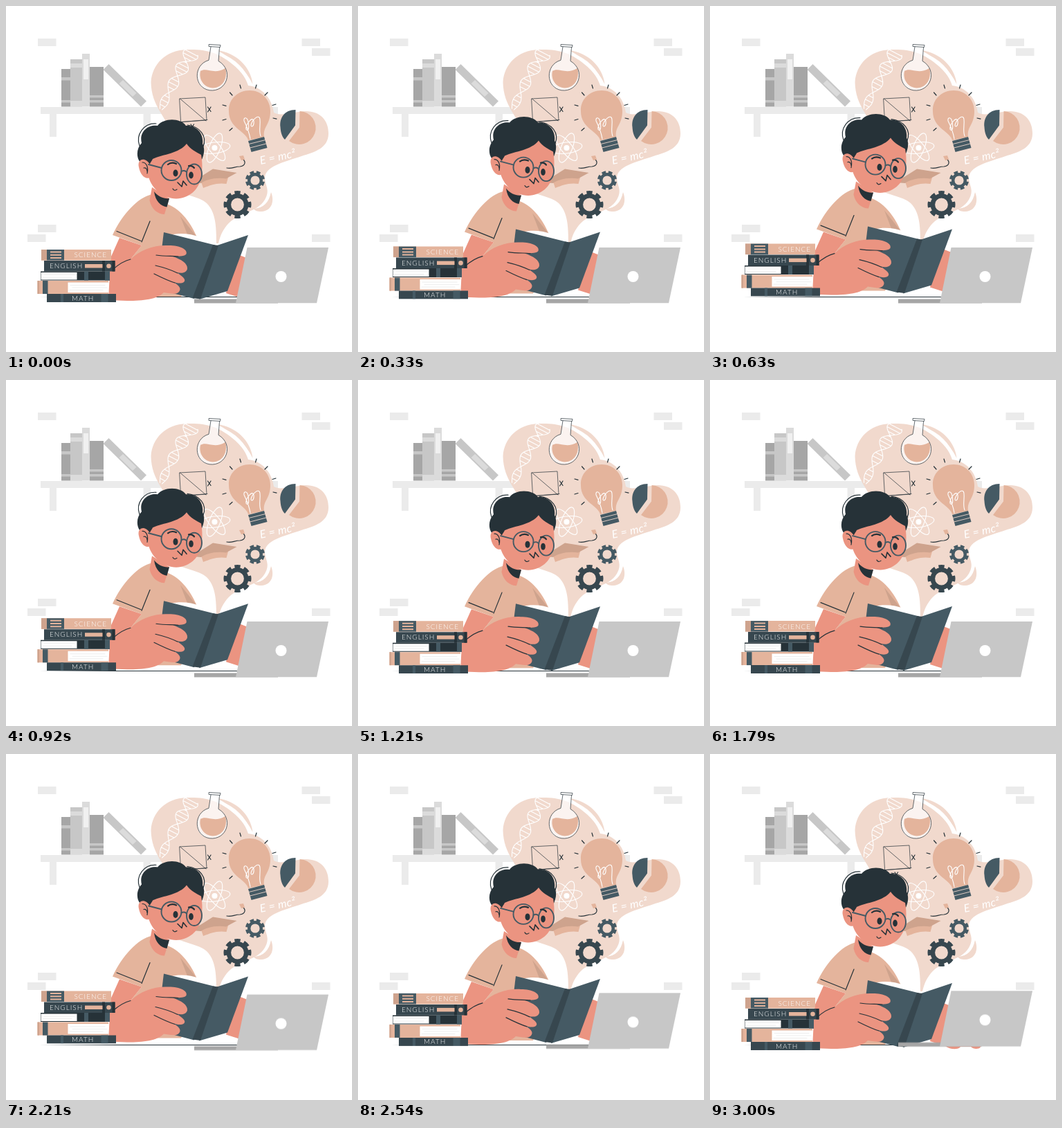
These frames come from a looping animation (500 px wide and 500 px high, 3.04 s). An HTML page:

```html
<!DOCTYPE html>
<html lang="en">
<head>
<meta charset="utf-8">
<title>Studying</title>
<style>
  html, body { margin: 0; width: 100%; height: 100%; overflow: hidden; background: #fff; }
  svg { display: block; width: 100vw; height: 100vh; }
  :root { --tan: #e4b49c; --pale: #f1d9cd; --shade: #cea38d; --skin: #eb9481; --ink: #263238; --slate: #455a64; --deep: #37474f; }
  .tan { fill: var(--tan); } .pale { fill: var(--pale); } .shade { fill: var(--shade); }
  .skin { fill: var(--skin); } .ink { fill: var(--ink); } .slate { fill: var(--slate); }
  .deep { fill: var(--deep); } .white { fill: #fff; }
  .g1 { fill: #ebebeb; } .g2 { fill: #dbdbdb; } .g3 { fill: #c7c7c7; } .g4 { fill: #a6a6a6; }
  .line { fill: none; stroke: var(--ink); stroke-width: 1.2; stroke-linecap: round; stroke-linejoin: round; }
  .thin { stroke-width: .7; }
  .chalk { fill: none; stroke: #fff; stroke-width: 1.1; stroke-linecap: round; }
  .gear { fill: none; }
  .label { font: 300 10px Lato, "Open Sans", sans-serif; fill: #fff; letter-spacing: 1px; }

  #bob { animation: bob 3040ms linear infinite; }
  #laptop { animation: rise 3040ms linear infinite; }
  /* two 1500 ms bobs, then a short rest */
  @keyframes bob {
    0%, 49.342%, 98.684%, 100% { transform: translateY(0); }
    24.671%, 74.013% { transform: translateY(-10px); }
  }
  /* waits 2 s, then climbs and snaps back */
  @keyframes rise {
    0%, 65.789% { transform: translateY(0); }
    100% { transform: translateY(-6.93px); }
  }
</style>
</head>
<body>
<svg viewBox="0 0 500 500" xmlns="http://www.w3.org/2000/svg">

  <g id="wall">
    <path class="g1" d="M46 47h26.500v11h-26.500zM427.500 47h26.500v11h-26.500zM442 61h26.500v11h-26.500zM46 316h26.500v11h-26.500zM31 330h26.500v11h-26.500zM442 330h26.500v11h-26.500z"/>
    <path class="g1" d="M50 146h343v10h-343zM63 156h10v33h-10zM198.500 156h10.500v33h-10.500z"/>
    <path class="g4" d="M80 91h13v54.500h-13zM121 88h20v57.500h-20z"/>
    <path class="g3" d="M80 103h13v4.500h-13zM80 136h13v3.500h-13zM121 129h20v3.500h-20zM121 136h20v3.500h-20zM93 77h17v68.500h-17z"/>
    <path class="g2" d="M93 83h17v6h-17zM93 137h17v8.500h-17zM110 69h11v76.500h-11z"/>
    <path fill="#f0f0f0" d="M112 77h7v29h-7z"/>
    <path class="g3" d="M148.500 84L203 137.500L195 145.500L140.500 92Z"/>
    <path class="g2" d="M169 107L188.500 126L183 131L163.500 112Z"/>
  </g>

  <g id="ideas">
    <path class="pale" d="M209.500 110C211 85 230 64 261 63C290 62 306 68 322 80C337 91 346 102 350 115C369 117 384 132 387 154C396 160 414 153 433 152C455 152 466 166 466 184C466 205 447 211 427 217C400 226 374 232 374 249C375 261 382 266 374 280C363 299 334 298 319 317C311 327 309 335 307 343L304 343C304 318 303 298 290 285C280 275 250 272 238 262C226 240 238 205 236 180C232 160 210 145 209.500 110Z"/>
    <path class="pale" d="M305 64C332 67 354 88 356.500 113C346 91 328 76 305 64Z"/>
    <path class="chalk" style="stroke-width:2.200" d="M308 69C330 76 346 92 353 113"/>
    <path class="pale" d="M383 269C388 281 385 296 369 297C363 297 360 296 358 293C372 292 380 284 383 269Z"/>

    <path id="helix" class="chalk"/>

    <g class="white" opacity=".7">
      <path d="M296 59L308 60L307 79.500C330 93 319 125 293 121.800C270 118 271 85 293 78.300Z"/>
    </g>
    <path class="tan" d="M281 94C290 88 300 100 317 90C321 103 314 118 299 118.500C286 118 278 106 281 94Z"/>
    <path class="line thin" d="M293.500 55.500L310 56.500L309.500 59.500L293.500 58.500ZM296 59L293 78.300C270 85 271 118 294 121.800C319 125 330 93 307 79.500L308.500 60"/>

    <path class="line thin" d="M251 134L288 132L290 165L253 167.500ZM251.500 134L289 166M250 168L291 164.500"/>
    <path class="line" d="M291.500 146l4.500 6.500M296 146l-4.500 7M267 171l4.500 6.500M271.500 171l-4.500 7"/>

    <path class="tan" d="M350 194C347 181 322 177 322 152C321 135 335 122 352 122C369 122 382 135 382 152C382 172 371 174 373 189Z"/>
    <path class="chalk" d="M353 192C351 180 347 172 344 166C343 160 349 160 350 168C352 178 349 182 347 178C346 172 356 158 358 166C359 174 354 176 354 172C356 164 366 155 367 164C368 172 365 180 368 188"/>
    <path class="slate" d="M350 195L373 189L377.500 205L354.500 211Z"/>
    <path class="chalk" d="M351 199.500L375 193.500M352.500 205L376 199" style="stroke:var(--pale);stroke-width:.9"/>
    <path class="line" d="M323.500 125l3.500 4M338 114l1.500 5M362 114l-1.500 5M378 125l-4 4M385 143.500l5-1.500M386 162l5 1.200M313 143l5 1.300M313 165l5-1.500M323 180l4-3.500"/>

    <path class="slate" d="M418 172.500L418.500 150C402 150 395 162 396.500 175C397 183 399 189 403 193Z"/>
    <path class="tan" d="M424 175.500L424.500 152A24 24 0 1 1 409 195Z"/>
    <text transform="translate(368 229) rotate(-12)" font-family="Lato, 'Open Sans', sans-serif" font-style="italic" font-size="16" letter-spacing=".3" class="white">E = mc²</text>

    <g class="chalk" transform="translate(301.500 205)">
      <ellipse rx="22.500" ry="8" transform="rotate(-8)"/>
      <ellipse rx="22.500" ry="8" transform="rotate(52)"/>
      <ellipse rx="22.500" ry="8" transform="rotate(112)"/>
      <circle r="3.500" fill="#fff"/>
    </g>

    <path class="tan" d="M282 254L289 248L321 248L318.500 257C305 255 295 259 285 263Z"/>
    <path class="shade" d="M268 255L299 235.500L333.500 241L318 249.500C304 247 288 251 282 256Z"/>
    <path class="line" d="M319 234C326 236 330 232 338 232C346 231 347 225 342 221"/>
    <path class="tan" d="M337 217L343 216L345 222L340 223Z"/>

    <g class="gear" stroke="#37474f">
      <circle cx="334.500" cy="287" r="12.700" stroke-width="6.600"/>
      <circle cx="334.500" cy="287" r="17.500" stroke-width="5" pathLength="16" stroke-dasharray="1.200 .8" stroke-dashoffset=".6"/>
    </g>
    <g class="gear" stroke="#455a64">
      <circle cx="360" cy="252" r="8.800" stroke-width="4.400"/>
      <circle cx="360" cy="252" r="12" stroke-width="4" pathLength="16" stroke-dasharray="1.200 .8" stroke-dashoffset="-.4"/>
    </g>
  </g>

  <path class="ink" d="M48 420.400L160 420L340 420L449 420.400L340 420.900L160 420.900Z"/>

  <g id="bob">
    <!-- torso -->
    <path class="tan" d="M211 272C190 277 168 301 154 331L196 346L180 366L205 420L253 420L290 345L276 334C265 309 250 292 232 286Z"/>
    <path class="shade" d="M252 304L276 334L262 330Z"/>
    <path class="line" d="M160 325.500L195 339.500M208 311L196 341"/>
    <path class="skin" d="M211 262L207.500 281C210 294 220 301 229 301L236 278Z"/>
    <path class="ink" d="M214 268C220 276 229 279 236 278L232.500 290.500C224 289 216 283 214 268Z"/>

    <!-- far arm -->
    <path class="skin" d="M330 357L350 365L346 400L390 418C396 427 381 428 377 423L362 423C359 428 346 427 340 422L318 415Z"/>

    <!-- head -->
    <path class="ink" d="M203 231C188 228 186 208 196 198C192 182 205 171 219 173C228 161.500 252 161.500 260 173C275 172 286 184 284 199C288 207 286 216 282 224L215 236Z"/>
    <path class="line" d="M193 202C187 186 199 169 217 170M262 172C280 174 291 188 285 203"/>
    <path class="skin" d="M205 240C205 230 209 227 212 221C228 214 250 213 261 199C266 207 275 211 282 215C284 226 284 238 282 247C279 266 264 278 246 278.500C228 278 211 265 206 247Z"/>
    <path class="skin" d="M208 229C201 217 189 221 192 233C194 244 201 251 208 248Z"/>
    <path class="line" d="M197 226C203 226 206 233 204 242M199 234C202 233 204 236 204 239"/>
    <g class="line" style="stroke:var(--slate);stroke-width:1.900">
      <circle cx="239" cy="237.500" r="14.500"/>
      <ellipse cx="272" cy="243" rx="11" ry="14.500"/>
      <path d="M206 229L225 234M253.500 239Q258 236.500 261 240"/>
    </g>
    <ellipse class="ink" cx="245" cy="241.500" rx="3.500" ry="5"/>
    <ellipse class="ink" cx="267.500" cy="244.500" rx="3.300" ry="5"/>
    <path class="line" style="stroke-width:2.200" d="M234 229Q239 225 246 228M264 231Q269 230 272 234"/>
    <path class="line" style="stroke-width:1.600" d="M248 255L254 261L256 253L261 259"/>
    <path class="line" d="M241 264Q243 268 247 265"/>

    <!-- open book -->
    <path class="white" d="M238 331C260 325 288 334 304 346Z"/>
    <path class="slate" d="M228 327L302 345.500L272 423L218 409Z"/>
    <path class="slate" d="M305 346L350 331L320 412L279 424Z"/>
    <path class="deep" d="M299 345L307 346L281 423.500L269.500 422Z"/>

    <!-- near arm and hand -->
    <path class="skin" d="M164 335L196 346L180 366C194 352 214 345 235 346C252 346 263 352 260.500 358.500C257 363 247 361 241 362C253 366 263 372 262 380C260 387 252 386 247 385C255 391 261 395 257 399C253 402 246 400 242 399C250 404 254 408 250 413C246 418 235 415 228 414C218 424 199 426 175 426L148 425L151 364Z"/>
    <path class="line" d="M154 381C162 374 171 368 180 366M217 360C230 362 240 361 249 362M216 375C229 378 240 382 248 386M214 387C224 392 234 397 244 400"/>

    <!-- stack of books -->
    <path class="tan" d="M51 352h101v15.500h-101z"/>
    <path class="shade" d="M51 352h8v15.500h-8z"/>
    <path class="slate" d="M59 352h25v15.500h-25z"/>
    <path class="tan" d="M64 354.500h16v2h-16zM64 358.800h16v2h-16zM64 363h16v2h-16z"/>
    <text class="label" x="98.500" y="363.500">SCIENCE</text>

    <path class="deep" d="M55 368h102.500v15.500h-102.500z"/>
    <path class="ink" d="M139 368h4v15.500h-4zM153.500 368h4v15.500h-4z"/>
    <path class="tan" d="M114 373h25.500v5.500h-25.500z"/>
    <circle class="tan" cx="148.500" cy="375.800" r="3.300"/>
    <text class="label" x="63" y="379.200">ENGLISH</text>

    <path class="ink" d="M50 383.500h100v13h-100z"/>
    <path class="white" d="M50.500 385h52v10.500h-52z"/>
    <path class="slate" d="M113 383.500h6v13h-6zM143 383.500h7v13h-7z"/>

    <path class="tan" d="M45.500 397h102.500v19h-102.500z"/>
    <path class="shade" d="M45.500 397h2.500v19h-2.500z"/>
    <path class="slate" d="M53 397h7.500v19h-7.500z"/>
    <path class="white" d="M89.500 399.500h58.500v14.500h-58.500z"/>
    <path class="line" style="stroke:#dbdbdb;stroke-width:.5" d="M55 388.500h44M53 392h42M93 403.500h50M96 407h50M92 410.500h48"/>

    <path class="deep" d="M59 416h100v12h-100z"/>
    <path class="slate" d="M79 416h4v12h-4zM137.500 416h10v12h-10z"/>
    <text class="label" x="95" y="425.600">MATH</text>
  </g>

  <g id="laptop">
    <path class="g4" d="M272 423.500h121v6h-121z"/>
    <path class="g3" d="M348.500 349H466L449 429.300H332Z"/>
    <circle class="white" cx="397.500" cy="391" r="8"/>
  </g>
</svg>
<script>
  // Double helix: two strands swinging around a curved axis, joined by rungs.
  const bend = (a, b, c, s) => (1 - s) ** 2 * a + 2 * s * (1 - s) * b + s * s * c;
  const point = (s, side) => {
    const swing = side * (12 - 7 * s) * Math.sin(s * Math.PI * 3.6 + 0.9);
    return (bend(269, 247, 224, s) + swing * 0.86).toFixed(1) + " " +
           (bend(67, 98, 149, s) + swing * 0.45).toFixed(1);
  };
  const steps = Array.from({ length: 61 }, (_, i) => i / 60);
  const strand = side => "M" + steps.map(s => point(s, side)).join("L");
  const rungs = steps.filter((_, i) => i % 4 === 1)
    .map(s => "M" + point(s, 1) + "L" + point(s, -1)).join("");
  document.getElementById("helix").setAttribute("d", strand(1) + strand(-1) + rungs);
</script>
</body>
</html>
```
